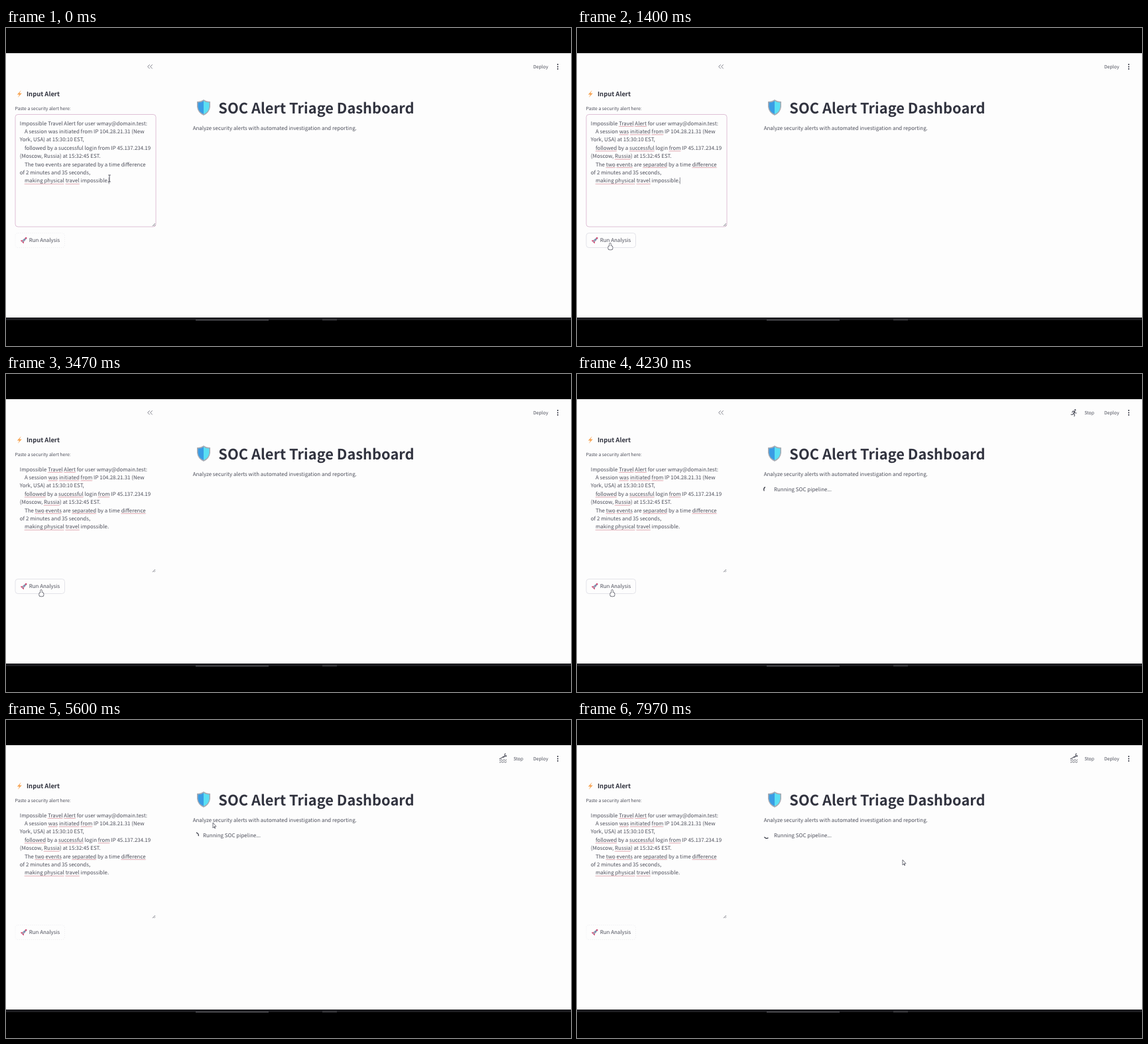
These frames come from a looping animation (852x480 px, 8 s). An HTML page with a canvas:

```html
<!DOCTYPE html>
<html lang="en">
<head>
<meta charset="utf-8">
<title>Alert triage dashboard</title>
<style>
  html, body { margin: 0; width: 100%; height: 100%; overflow: hidden; background: #000; }
  canvas { display: block; width: 852px; height: 480px; }
</style>
</head>
<body>
<canvas id="stage" width="852" height="480"></canvas>
<script>
const ctx = document.getElementById('stage').getContext('2d');
const LOOP = 8000;
const FAMILY = '"Noto Sans CJK JP", "Noto Sans CJK SC", "Noto Sans CJK", Lato, sans-serif';
const INK = '#31333f', SOFT = '#4d4f5b', PAGE = '#fdfdfd';
const TITLE = 21.8, HEADING = 9.45, BODY = 7.95, SMALL = 6.9;

const SPELL_AT = 500, BLUR_AT = 3000, SPIN_AT = 3650, STOP_AT = 3900;
const GLIDE = 550, POSE_MS = 592;

const BOX = { x: 14, y: 130.5, w: 212, h: 169.5 };
const BUTTON = { x: 14, y: 309.5, w: 74.5, h: 22 };

// Each line of the alert, followed by its marked phrases
const ALERT = [
  ['Impossible Travel Alert for user wmay@domain.test:', 'Travel', 'Alert'],
  ['    A session was initiated from IP 104.28.21.31 (New', 'was', 'initiated', 'from'],
  ['York, USA) at 15:30:10 EST,'],
  ['    followed by a successful login from IP 45.137.234.19', 'followed', 'successful', 'from'],
  ['(Moscow, Russia) at 15:32:45 EST.', 'Russia'],
  ['    The two events are separated by a time difference', 'two', 'events', 'separated', 'difference'],
  ['of 2 minutes and 35 seconds,'],
  ['    making physical travel impossible.', 'making physical', 'travel']
];

// Where the pointer comes to rest, and when it arrives
const STOPS = [
  { at: 0, x: 156, y: 227 },
  { at: 1050, x: 50, y: 325 },
  { at: 2300, x: 53, y: 326 },
  { at: 4830, x: 399, y: 186 },
  { at: 5600, x: 312, y: 155 },
  { at: 5890, x: 491, y: 211 }
];

const ease = p => p * p * (3 - 2 * p);
const mix = (a, b, k) => a + (b - a) * k;

function pointerAt(t) {
  const i = STOPS.findIndex(s => s.at > t);
  if (i < 0) return STOPS.at(-1);
  const from = STOPS[i - 1], to = STOPS[i];
  const start = Math.max(from.at, to.at - GLIDE);
  const k = ease(Math.max(0, (t - start) / (to.at - start)));
  return { x: mix(from.x, to.x, k), y: mix(from.y, to.y, k) };
}

const inside = (p, r) => p.x >= r.x && p.x <= r.x + r.w && p.y >= r.y && p.y <= r.y + r.h;

function text(str, x, y, size, color = SOFT, weight = 400) {
  ctx.font = `${weight} ${size}px ${FAMILY}`;
  ctx.fillStyle = color;
  ctx.fillText(str, x, y);
}

function rect(x, y, w, h, color) {
  ctx.fillStyle = color;
  ctx.fillRect(x, y, w, h);
}

function trace(points) {
  ctx.beginPath();
  points.forEach(([x, y]) => ctx.lineTo(x, y));
}

function stroke(color, width = 1) {
  ctx.strokeStyle = color;
  ctx.lineWidth = width;
  ctx.stroke();
}

function line(points, color = SOFT, width = 0.9) {
  trace(points);
  stroke(color, width);
}

function poly(points, color) {
  trace(points);
  ctx.closePath();
  ctx.fillStyle = color;
  ctx.fill();
}

function oval(x, y, rx, ry, color) {
  ctx.beginPath();
  ctx.ellipse(x, y, rx, ry, 0, 0, Math.PI * 2);
  ctx.fillStyle = color;
  ctx.fill();
}

const dot = (x, y, r, color = SOFT) => oval(x, y, r, r, color);

function arc(x, y, r, from, to, color, width) {
  ctx.beginPath();
  ctx.arc(x, y, r, from, to);
  stroke(color, width);
}

function frame({ x, y, w, h }, color, dash = []) {
  ctx.beginPath();
  ctx.roundRect(x, y, w, h, 4);
  ctx.setLineDash(dash);
  stroke(color);
  ctx.setLineDash([]);
}

function at(x, y, draw) {
  ctx.save();
  ctx.translate(x, y);
  draw();
  ctx.restore();
}

function wave(x, y, w, size, length, color, width) {
  ctx.beginPath();
  for (let d = 0; d <= w; d += 0.5) {
    ctx.lineTo(x + d, y + size * Math.sin(d / length * Math.PI * 2));
  }
  stroke(color, width);
}

function bolt() {
  const half = [[2.5, -5.5], [-3.5, 1], [0, 1]];
  poly([...half, ...half.map(([x, y]) => [-x, -y])], '#f6a04c');
}

function shieldPath(s) {
  ctx.beginPath();
  for (const side of [-s, s]) {
    ctx.moveTo(0, -12 * s);
    ctx.quadraticCurveTo(4 * side, -9 * s, 10 * side, -9 * s);
    ctx.lineTo(10 * side, -s);
    ctx.quadraticCurveTo(9 * side, 8 * s, 0, 12 * s);
  }
}

function shield() {
  shieldPath(1);
  ctx.fillStyle = '#a6abb4';
  ctx.fill();
  shieldPath(0.84);
  ctx.clip();
  rect(-10, -12, 10, 24, '#3a9ce4');
  rect(0, -12, 10, 24, '#5adff4');
}

function rocket() {
  ctx.rotate(Math.PI / 4);
  poly([[0, -1], [-3.4, 4], [3.4, 4]], '#dc3c6c');
  oval(0, -1, 1.6, 5, '#a5a3b4');
  dot(0, -4.4, 1.2, '#dc3c6c');
  dot(0, -1, 0.9, '#4a7cb8');
}

// A chain of short limbs; angles run from straight down
function limb(x, y, length, ...angles) {
  const points = [[x, y]];
  for (const a of angles) {
    x += length * Math.sin(a);
    y += length * Math.cos(a);
    points.push([x, y]);
  }
  line(points, SOFT, 1.1);
}

function figure(lean, arms, legs) {
  ctx.save();
  ctx.rotate(lean);
  dot(0, -4.6, 1.2);
  line([[0, -2.8], [0, 1]], SOFT, 1.7);
  arms.forEach(a => limb(0, -2.5, 2.6, ...a));
  legs.forEach(a => limb(0, 1, 2.6, ...a));
  ctx.restore();
}

const poses = [
  function gymnast() {
    figure(0, [[-1.7, -1.7], [1.7, 1.7]], [[-0.3, -0.2], [0.3, 0.2]]);
  },
  function swimmer() {
    at(0, -2.5, () => figure(1.2, [[-2, -2.4]], [[0.2, 0]]));
    for (const y of [2, 5]) wave(-5.5, y, 11, 0.6, 4, SOFT, 0.9);
  },
  function cyclist() {
    figure(0.5, [[0.8, 1.4]], [[1.2, -0.6]]);
    for (const x of [-3.3, 3.3]) arc(x, 3, 2, 0, Math.PI * 2, SOFT, 0.9);
  },
  function runner() {
    figure(0.4, [[-1.2, -0.2], [0.6, 1.9]], [[0.9, 0.2], [-0.4, -1.2]]);
  }
];

function ibeam() {
  for (const y of [-5, 5]) line([[-1.8, y], [1.8, y]]);
  line([[0, -5], [0, 5]]);
}

function hand() {
  ctx.beginPath();
  ctx.roundRect(-2.8, 4, 6.4, 5.5, 2);
  ctx.roundRect(-0.8, 0, 1.7, 6, 0.8);
  stroke(SOFT, 1.4);
  ctx.fillStyle = PAGE;
  ctx.fill();
}

function arrow() {
  const head = [[0, 0], [0, 8], [2, 6], [5, 5.7]];
  line([[2.2, 6], [3.4, 8.8]], SOFT, 1.4);
  poly(head, PAGE);
  line([...head, head[0]], SOFT, 0.8);
}

function drawBackdrop() {
  rect(0, 0, 852, 480, '#000');
  rect(0, 38, 852, 399, PAGE);
  rect(0, 437, 852, 4, '#1c1c20');
  rect(286, 440, 110, 1.5, '#55555a');
  rect(477, 439, 22, 2.5, '#36363a');
}

function drawAlert(t) {
  const focused = t < BLUR_AT;
  if (focused) frame(BOX, '#dfc0d6');
  for (const d of [1.6, 4]) line([[225 - d, 299], [225, 299 - d]], SOFT, 0.7);

  ALERT.forEach(([str, ...marks], i) => {
    const x = 20.8, y = 146.5 + i * 12.42;
    text(str, x, y, BODY);
    if (t < SPELL_AT && i < ALERT.length - 1) return;
    for (const mark of marks) {
      const before = ctx.measureText(str.slice(0, str.indexOf(mark))).width;
      wave(x + before, y + 2, ctx.measureText(mark).width, 0.5, 2, '#d27a88', 0.8);
    }
  });
  if (focused && t % 1060 < 530) rect(154.8, 225.5, 0.8, 10, '#73747f');
}

function drawSidebar(t, pointer) {
  if (pointer.x < 240) {
    for (const x of [216.7, 220.7]) line([[x, 55.2], [x - 3, 58.3], [x, 61.4]], '#73747f');
  }
  at(20.3, 99.5, bolt);
  text('Input Alert', 31, 103, HEADING, INK, 600);
  text('Paste a security alert here:', 13.6, 124.2, SMALL);
  drawAlert(t);

  const hover = inside(pointer, BUTTON);
  frame(BUTTON, hover ? '#e3e3e9' : '#ececf0', hover ? [] : [1, 2]);
  at(27, 320.3, rocket);
  text('Run Analysis', 34.7, 323.2, BODY);
}

function drawSpinner(t) {
  const mid = (100 + 0.36 * (t - 7970)) * Math.PI / 180;
  arc(286, 174.3, 4.3, mid - Math.PI / 4, mid + Math.PI / 4, INK, 1.3);
  text('Running SOC pipeline...', 297, 177, BODY);
}

function drawMain(t) {
  at(298, 120, shield);
  text('SOC Alert Triage Dashboard', 320.3, 129, TITLE, INK, 700);
  text('Analyze security alerts with automated investigation and reporting.', 281.7, 154, BODY);

  text('Deploy', 795, 61.2, SMALL);
  for (const step of [-1, 0, 1]) dot(832, 58.4 + step * 3.3, 1, INK);

  if (t >= SPIN_AT) drawSpinner(t);
  if (t >= STOP_AT) {
    const turn = Math.floor((t - 2302) / POSE_MS) % poses.length;
    at(749.5, 58.5, poses[turn]);
    text('Stop', 765.2, 61.2, SMALL);
  }
}

function drawPointer(p) {
  const shape = inside(p, BOX) ? ibeam : inside(p, BUTTON) ? hand : arrow;
  at(p.x, p.y, shape);
}

function render(t) {
  const pointer = pointerAt(t);
  ctx.textRendering = 'geometricPrecision';
  drawBackdrop();
  drawSidebar(t, pointer);
  drawMain(t);
  drawPointer(pointer);
}

const start = performance.now();
function tick() {
  render((performance.now() - start) % LOOP);
  requestAnimationFrame(tick);
}
tick();
</script>
</body>
</html>
```
